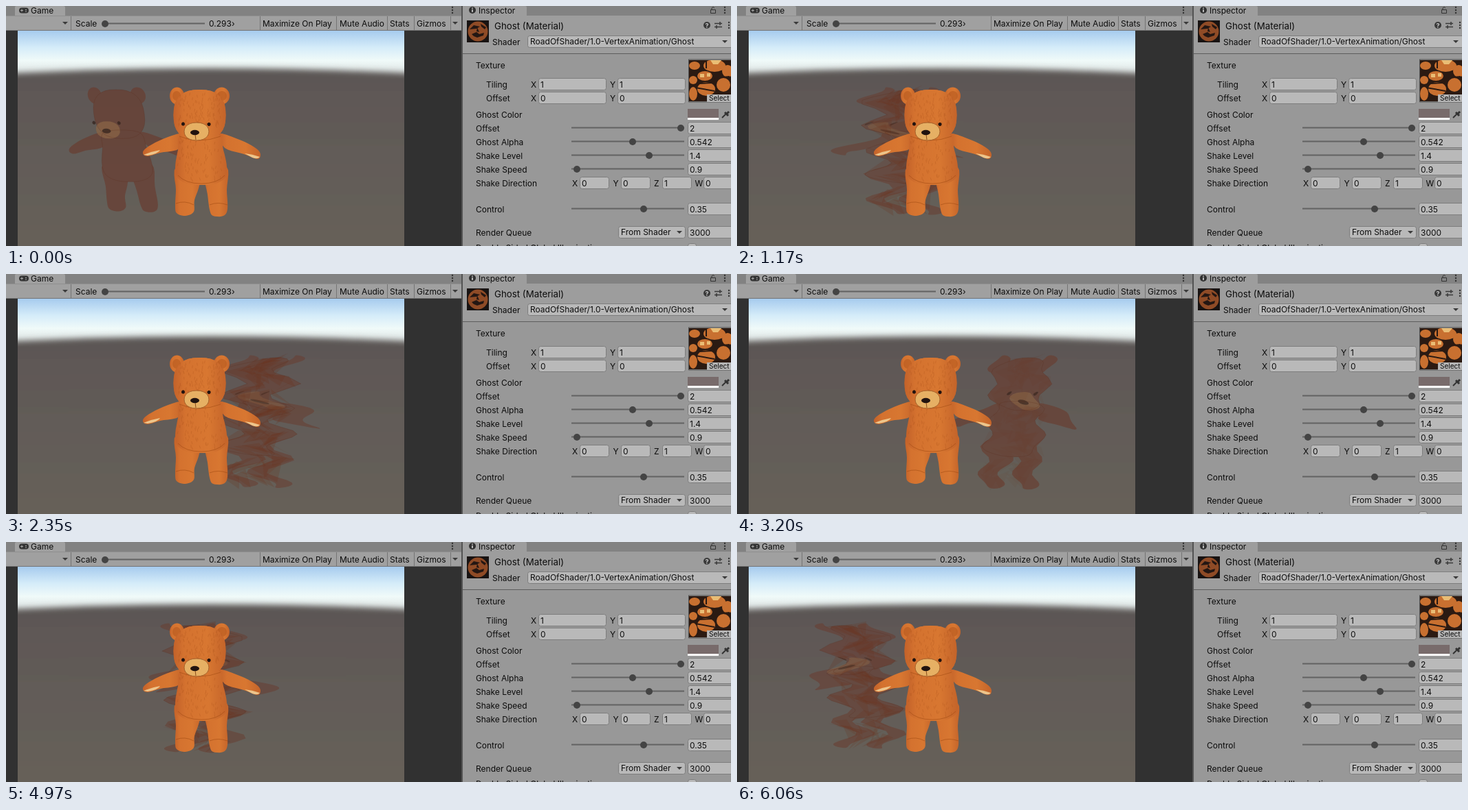
An HTML page that plays this animation: 1054x350 px, repeating every 6140 ms.

```html
<!DOCTYPE html>
<html lang="en">
<head>
<meta charset="utf-8">
<title>Ghost shader</title>
<style>
  html, body { margin: 0; width: 100%; height: 100%; overflow: hidden; background: #313131; }
  svg { display: block; width: 100vw; height: 100vh; }
  text { font: 12px Inter, "Liberation Sans", sans-serif; fill: #0c0c0c; }
</style>
</head>
<body>
<svg viewBox="0 0 1054 350">
  <defs>
    <linearGradient id="sky" x2="0" y2="1">
      <stop offset="0" stop-color="#a6cbee"/>
      <stop offset=".35" stop-color="#d5ecf9"/>
      <stop offset=".62" stop-color="#f0faf9"/>
      <stop offset="1" stop-color="#d5dad9"/>
    </linearGradient>
    <linearGradient id="ground" x2="0" y2="1">
      <stop offset="0" stop-color="#5b5654"/>
      <stop offset=".2" stop-color="#605957"/>
      <stop offset="1" stop-color="#68625a"/>
    </linearGradient>
    <linearGradient id="round">
      <stop offset="0" stop-color="#c3622a"/>
      <stop offset=".2" stop-color="#d4722f"/>
      <stop offset=".65" stop-color="#d87731"/>
      <stop offset="1" stop-color="#c4642a"/>
    </linearGradient>
    <filter id="haze" x="-10%" y="-10%" width="120%" height="120%"><feGaussianBlur stdDeviation="4.5"/></filter>
    <clipPath id="view"><rect x="17" y="36" width="562" height="314"/></clipPath>
    <clipPath id="thumb"><rect x="993" y="79" width="61" height="60"/></clipPath>
  </defs>

  <!-- game view -->
  <rect width="1054" height="350" fill="#313131"/>
  <g clip-path="url(#view)">
    <rect x="17" y="36" width="562" height="70" fill="url(#sky)"/>
    <path d="M-40 101Q298 81 636 101V390H-40Z" fill="url(#ground)" filter="url(#haze)"/>
    <g id="ghost"></g>
    <g id="bear"></g>
  </g>

  <!-- game tab and toolbar -->
  <rect width="662" height="14" fill="#828282"/>
  <path d="M13 14V2Q13 0 15 0H84Q86 0 86 2V14Z" fill="#a0a0a0"/>
  <rect y="14" width="662" height="22" fill="#a0a0a0"/>
  <path d="M0 14.5H662" stroke="#909090"/>
  <path d="M0 35.5H662M369.5 15V36M480.5 15V36M554.5 15V36M593.5 15V36M646.5 15V36M94.5 15V36" stroke="#747474"/>
  <rect x="19" y="2.5" width="14" height="8" rx="4" fill="#333"/>
  <path d="M21 6.5H25M23 4.5V8.5M28 5.5H30M28 8H30" stroke="#aaa"/>
  <path d="M144 25.5H289" stroke="#626262" stroke-width="2"/>
  <circle cx="144" cy="26" r="5" fill="#444"/>

  <!-- inspector panel -->
  <rect x="662" width="392" height="350" fill="#989898"/>
  <rect x="664" width="390" height="14" fill="#828282"/>
  <path d="M664 14V0H755Q757 0 757 2V14Z" fill="#9d9d9d"/>
  <rect x="664" y="14" width="390" height="55" fill="#9d9d9d"/>
  <path d="M664 69.5H1054" stroke="#5d5d5d"/>
  <rect x="662" width="2" height="350" fill="#535353"/>
  <circle cx="678" cy="6" r="5" fill="#303030"/>
  <path d="M678 5V9M678 2.5V4" stroke="#ddd" stroke-width="1.5"/>
  <path d="M1024.5 5.5H1031.5V10.5H1024.5ZM1026 5V3Q1028 0 1030 3" fill="none" stroke="#333"/>

  <rect x="670" y="21" width="32" height="32" fill="#181312"/>
  <circle cx="686" cy="37" r="14.5" fill="#8f4b26"/>
  <path d="M674 34L680 28L689 30L684 33ZM690 26L698 31L696 34L691 30ZM677 41L684 38L688 41L695 39L694 43L685 46L680 44ZM685 31L688 38L684 37Z" fill="#241713"/>
  <circle cx="1019" cy="28" r="5" fill="#3a3a3a"/>
  <text x="1016.5" y="31.5" style="font-size:9px;font-weight:700;fill:#ccc">?</text>
  <path d="M1030 25.5H1041M1030 30.5H1041M1038 23V28M1033 28V33" stroke="#3a3a3a" stroke-width="1.5"/>

  <g clip-path="url(#thumb)">
    <rect x="993" y="79" width="61" height="60" fill="#2b1a12"/>
    <g fill="#c87030">
      <ellipse cx="1001" cy="87" rx="8" ry="6"/><ellipse cx="1030" cy="87" rx="16" ry="9"/>
      <ellipse cx="1049" cy="95" rx="8" ry="9"/><ellipse cx="1016" cy="102" rx="11" ry="7"/>
      <ellipse cx="999" cy="108" rx="6" ry="6"/><ellipse cx="1043" cy="115" rx="10" ry="10"/>
      <ellipse cx="1018" cy="121" rx="13" ry="10"/><ellipse cx="999" cy="128" rx="6" ry="10"/>
    </g>
    <path d="M1009 99H1015V104H1009ZM1019 98H1024V103H1019Z" fill="#e9bd75"/>
    <path d="M1024 79H1040L1035 85H1028Z" fill="#e9bd75"/>
    <path d="M998 97L1012 94M1029 105L1052 103M1008 113L1027 112M1002 119L1030 124M1018 79V91" stroke="#2b1a12" stroke-width="2"/>
  </g>
  <path d="M992 78H1054M992.5 78V140H1054" fill="none" stroke="#505050"/>
  <rect x="1019" y="129" width="35" height="11" fill="#b5b5b5"/>

  <rect x="991" y="150" width="45" height="13" fill="#786b6b"/>
  <rect x="991" y="163" width="45" height="3" fill="#fff"/>
  <path d="M1041 163L1047 157" stroke="#333" stroke-width="2"/>
  <path d="M1045 155L1050 160M1048 157L1051 154" stroke="#333" stroke-width="3"/>
  <g id="ui"></g>
</svg>

<script>
const TAU = Math.PI * 2, LOOP = 6140, STEP = LOOP / 80;
const byId = id => document.getElementById(id);

// ---------- interface ----------
const label = (x, y, text, size = 12) => `<text x="${x}" y="${y}" style="font-size:${size}px">${text}</text>`;
const box = (x, y, w, h = 18) =>
  `<rect x="${x + .5}" y="${y + .5}" width="${w - 1}" height="${h - 1}" rx="3" fill="#b9b9b9" stroke="#7d7d7d"/>`;
const field = (x, cy, w, text) => box(x, cy - 9, w) + label(x + 3, cy + 5, text);
const slider = (cy, knob, value) =>
  `<path d="M822 ${cy - .5}H986" stroke="#636363" stroke-width="2"/>
   <circle cx="${knob}" cy="${cy}" r="5" fill="#444"/>` + field(991, cy, 68, value);
const arrow = (x, y) => `<path d="M${x - 4} ${y - 2}h8l-4 4z" fill="#3a3a3a"/>`;
const dots = (x, y) => [-4, 0, 4].map(d => `<circle cx="${x}" cy="${y + d}" r="1.2" fill="#333"/>`).join('');

const rows = [
  ['Offset', 178, 981, '2'], ['Ghost Alpha', 198, 911, '0.542'], ['Shake Level', 218, 935, '1.4'],
  ['Shake Speed', 238, 830, '0.9'], ['Control', 296, 927, '0.35']
];
byId('ui').innerHTML = [
  label(36, 11, 'Game'), label(101, 30, 'Scale'), label(295, 30, '0.293›'), label(373, 30, 'Maximize On Play'),
  label(485, 30, 'Mute Audio'), label(558, 30, 'Stats'), label(597, 30, 'Gizmos'),
  arrow(86, 25), arrow(653, 25), dots(649, 6), dots(1045, 6), dots(1051, 28),
  label(687, 11, 'Inspector'), label(710, 34, 'Ghost (Material)', 13.3), label(707, 57, 'Shader'),
  box(758, 43, 300), label(762, 56, 'RoadOfShader/1.0-VertexAnimation/Ghost'), arrow(1045, 52),
  label(683, 91, 'Texture'), label(1022, 138, 'Select', 10),
  ...[['Tiling', 114, 1], ['Offset', 134, 0]].map(([name, y, n]) =>
    label(698, y + 5, name) + label(763, y + 5, 'X') + field(774, y, 99, n) +
    label(878, y + 5, 'Y') + field(889, y, 99, n)),
  label(683, 163, 'Ghost Color'),
  ...rows.map(([name, y, knob, value]) => label(683, y + 5, name) + slider(y, knob, value)),
  label(683, 263, 'Shake Direction'),
  ...['X', 'Y', 'Z', 'W'].map((axis, i) =>
    label(823 + i * 59.5, 263, axis) + field(834 + i * 60, 258, 43, axis === 'Z' ? 1 : 0)),
  label(683, 335, 'Render Queue'), box(890, 321, 98), label(894, 334, 'From Shader'), arrow(979, 330),
  field(991, 330, 68, '3000'), label(683, 357, 'Double Sided Global Illumination'), box(991, 346, 13, 13)
].join('');

// ---------- bear outline, every part clockwise ----------
function blob(cx, cy, rx, ry, power = 2, count = 36) {
  const curve = v => Math.sign(v) * Math.abs(v) ** (2 / power);
  return Array.from({ length: count }, (_, i) => {
    const a = i / count * TAU;
    return [cx + rx * curve(Math.cos(a)), cy + ry * curve(Math.sin(a))];
  });
}

function smooth(points, steps = 5) {
  const at = i => points[(i + points.length) % points.length];
  return points.flatMap((p, i) => Array.from({ length: steps }, (_, k) => {
    const u = k / steps, a = at(i - 1), b = at(i + 1), c = at(i + 2);
    return [0, 1].map(d => p[d] + .5 * u * (b[d] - a[d] +
      u * (2 * a[d] - 5 * p[d] + 4 * b[d] - c[d] + u * (3 * (p[d] - b[d]) + c[d] - a[d]))));
  }));
}

const head = blob(281.5, 159, 38, 37, 2.5);
const torso = smooth([[256, 186], [307, 186], [316, 210], [321, 235], [318, 251], [300, 260], [268, 260], [250, 251], [246, 235], [250, 210]]);
const parts = [
  blob(248.5, 131, 10.5, 12.5), blob(313.5, 131, 11.5, 12.5),
  smooth([[252, 208], [224, 214], [206, 219], [199, 215], [204, 207], [228, 194], [258, 186]]),
  smooth([[310, 186], [342, 196], [364, 208], [370, 217], [365, 223], [346, 216], [318, 207]]),
  smooth([[247, 235], [283, 235], [281, 262], [274, 283], [273, 300], [261, 306], [248, 302], [246, 290], [247, 268]]),
  smooth([[288, 235], [321, 235], [321, 268], [322, 296], [316, 306], [301, 306], [296, 297], [293, 275]]),
  torso, head
];
const snout = blob(277, 183, 18, 13, 2.2, 24);
const darkSpots = [blob(274.5, 184.5, 6.5, 3.7, 2, 16), blob(257.5, 172, 2.5, 2.7, 2, 12), blob(295, 172.5, 2.5, 2.7, 2, 12)];

const path = points => 'M' + points.map(p => p.map(v => v.toFixed(1)).join(' ')).join('L') + 'Z';

let seed = 7;
const random = () => (seed = seed * 16807 % 2147483647) / 2147483647;
const spread = range => (random() * 2 - 1) * range;

const fur = Array.from({ length: 200 }, () => {
  const below = random() < .5;
  return `M${(282 + spread(32)).toFixed(1)} ${((below ? 222 : 150) + spread(below ? 31 : 24)).toFixed(1)}l${spread(1.5).toFixed(1)} 4`;
}).join('');

byId('bear').innerHTML =
  parts.map(p => `<path d="${path(p)}" fill="url(#round)"/>`).join('') +
  `<ellipse cx="248" cy="131" rx="6" ry="7" fill="#b0541c" opacity=".5"/>
   <ellipse cx="314" cy="131" rx="7" ry="7" fill="#b0541c" opacity=".5"/>
   <path d="${path(head)}" fill="url(#round)"/>
   <path d="${fur}" stroke="#a64f18" stroke-width=".8" opacity=".35"/>
   <path d="M252 190Q281 202 312 190M250 247Q261 259 284 259T318 247M247 288Q260 283 273 290M296 290Q308 285 322 290"
     fill="none" stroke="#98450f" opacity=".5"/>
   <path d="M200 217Q212 212 224 210Q222 215 206 218ZM347 215Q358 216 369 220Q366 224 358 221Z" fill="#edc58b"/>
   <path d="${path(snout)}" fill="#e6b064" stroke="#a4602a"/>
   <path d="M275 187L276 195" stroke="#8a4c1c"/>` +
  darkSpots.map(p => `<path d="${path(p)}" fill="#21130f"/>`).join('');

// ---------- ghost ----------
const shards = Array.from({ length: 70 }, () => {
  const y = 122 + random() * 172, x = 282 + spread(32);
  return [[x - 10, y], [x + 6 + random() * 14, y + spread(10)], [x + spread(14), y + 10 + random() * 14]];
});
const ghostFace = [[snout, '#8a6546'], ...darkSpots.map(p => [p, '#33231e'])];

function drawGhost(seconds) {
  const swing = seconds - .1;
  const offset = 12 - 120 * Math.cos(swing) - 6 * Math.cos(2 * swing);
  const shake = Math.sin(.9 * seconds), strength = Math.abs(shake);
  const scale = 1 + offset * .0003;
  // The face stands out towards the viewer, so it swings a little further.
  const move = ([x, y], depth) => [
    284 + (x - 284) * scale + offset * depth * (1.08 - .21 * (y - 118) / 188) +
      24 * shake * Math.cos((y - 122) / 36 * TAU),
    118 + (y - 118) * scale
  ];
  const moved = (points, depth = 1) => path(points.map(p => move(p, depth)));
  byId('ghost').innerHTML =
    `<path d="${parts.map(p => moved(p)).join('')}" fill="#693e32" opacity="${.74 - .2 * strength}"/>` +
    ghostFace.map(([p, color]) =>
      `<path d="${moved(p, 1.13)}" fill="${color}" opacity="${.75 - .35 * strength}"/>`).join('') +
    `<g fill="#6b2f17" opacity="${.9 * strength}">` +
    shards.map(p => `<path d="${moved(p)}" opacity=".25"/>`).join('') + '</g>' +
    `<path d="${[head, torso].map(p => moved(p)).join('')}" fill="none" stroke="#5a2c1c" stroke-width=".8" opacity=".3"/>`;
}

const start = performance.now();
function frame() {
  const time = (performance.now() - start) % LOOP;
  drawGhost(Math.floor(time / STEP) * STEP / 1000);
  requestAnimationFrame(frame);
}
frame();
</script>
</body>
</html>
```
